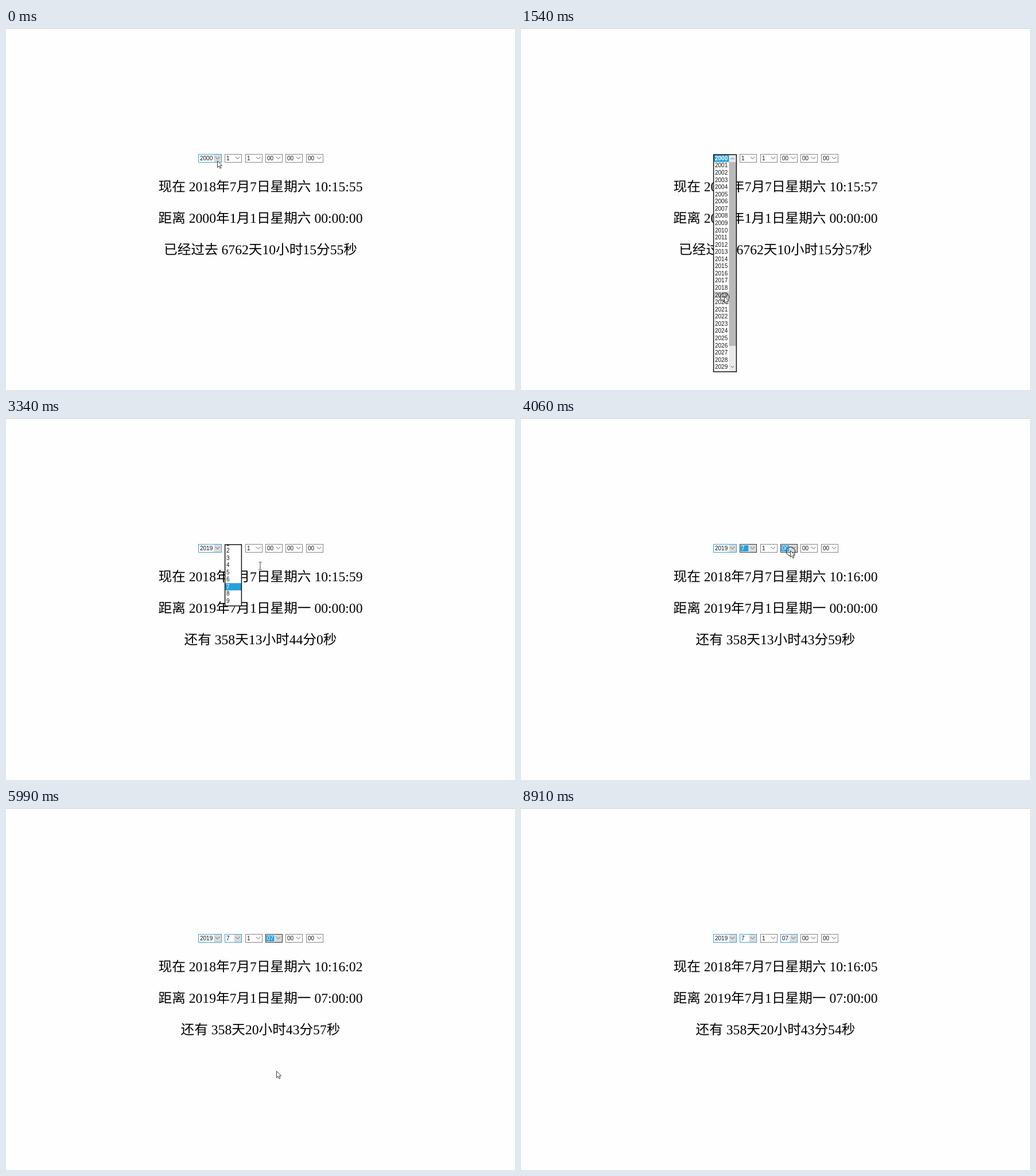
Write an HTML page that moves like this. It is 887x632 px and loops after 9.07 s.

```html
<!DOCTYPE html>
<html lang="zh-CN">
<head>
<meta charset="utf-8">
<title>日期倒计时</title>
<style>
html, body { margin: 0; width: 100%; height: 100%; overflow: hidden; background: #fefefe; }
svg { display: block; width: 887px; height: 632px; }
.line { font: 23.65px "Liberation Serif", "Noto Sans CJK SC", "Noto Sans CJK", serif; text-anchor: middle; text-rendering: geometricPrecision; }
.small { font: 10px "Liberation Sans", Arial, sans-serif; fill: #111; }
.white { fill: #fff; }
.bold { font-weight: bold; }
.chevron { fill: none; stroke: #555; }
</style>
</head>
<body>
<svg id="stage" viewBox="0 0 887 632"></svg>
<script>
const LOOP = 9070, STEP = 120, SECOND = 962;
const BLUE = '#26a0da';
const ROW = 12.57, TOP = 221.2;
const stage = document.getElementById('stage');
const pad = n => String(n).padStart(2, '0');

// Clicks alternate: open a select, pick a row; the last one lands on the blank page
const clicks = [460, 1540, 2140, 3100, 4060, 5140, 6100];

// Pointer moves: leave, arrive, x, y
const home = [368, 231.5];
const moves = [
  [580, 1420, 354, 468], [1660, 2020, 399, 231], [2260, 2980, 398, 301],
  [3220, 3340, 443, 258], [3340, 3940, 469, 231], [4180, 5020, 475, 320],
  [5500, 5980, 471, 459], [6220, 6460, 467, 457], [7540, 8540, 848, 632]
];
const GONE = 8660;

const selects = Array.from({ length: 6 }, (_, i) => {
  const l = i ? Math.round(345.9 + 35.36 * i) : 335;
  return { l, w: i ? 29 : 40, label: pad };
});
const [year, month, day, hour] = selects;
Object.assign(year, { rows: 30, pick: 19, label: i => 2000 + i, scroll: true });
Object.assign(month, { rows: 12, pick: 6, label: i => i + 1 });
Object.assign(hour, { rows: 24, pick: 7 });
day.label = month.label;

const active = [year, month, hour];
active.forEach((s, i) => {
  const [press, choose, leave] = clicks.slice(2 * i);
  Object.assign(s, { press, open: press + STEP, set: choose + STEP, close: choose + 2 * STEP, blur: leave + STEP });
});

const chosen = (s, t) => t >= s.set ? s.pick : 0;
const isOpen = (s, t) => t >= s.open && t <= s.close;

function pointer(t) {
  let [x, y] = home;
  for (const [leave, arrive, nx, ny] of moves) {
    const k = Math.min(1, Math.max(0, (t - leave) / (arrive - leave)));
    x += (nx - x) * k;
    y += (ny - y) * k;
  }
  return [x, y];
}

const rect = (x, y, w, h, fill, extra = '') =>
  `<rect x="${x}" y="${y}" width="${w}" height="${h}" fill="${fill}" ${extra}/>`;
const text = (x, y, str, cls) => `<text x="${x}" y="${y}" class="${cls}">${str}</text>`;
const chevron = (x, y, dir = 1, size = 3.7) =>
  `<path class="chevron" d="M${x - size} ${y - 2 * dir}l${size} ${size * dir} ${size} ${-size * dir}"/>`;

function drawSelect(s, t) {
  const { l, w } = s, r = l + w;
  const hot = t >= s.press - STEP || (s === year);
  const focus = t >= s.press && t < s.blur;
  const edge = focus ? '#333' : hot ? '#3ba3dc' : '#858585';
  return rect(l + .5, 220.5, w, 14, '#fff', `stroke="${edge}"`)
    + (hot ? rect(r - 12.5, 221, 12.5, 13, '#dadada') : '')
    + (focus ? rect(l + 1.5, 222, w - 15, 11, BLUE) : '')
    + text(l + 3, 231, s.label(chosen(s, t)), focus ? 'small white' : 'small')
    + chevron(r - 6.5, 227);
}

function drawList(s, t) {
  const { l, w } = s, r = l + w;
  const closing = t === s.close;
  const full = s.rows * ROW + 2;
  const h = full * (closing ? .7 : t === s.open ? .58 : 1);
  const top = closing ? TOP - 8.3 : TOP;
  const sel = chosen(s, t);
  const [px, py] = pointer(t - STEP); // the hover bar trails the pointer
  const over = !closing && px > l && px < r ? Math.floor((py - TOP) / ROW) : -1;

  let out = `<clipPath id="view"><rect x="${l}" y="221" width="${w + 1}" height="${h}"/></clipPath>`
    + rect(l + .5, 221, w, h, '#fff') + '<g clip-path="url(#view)">';
  for (let i = 0; i < s.rows; i++) {
    const y = top + i * ROW, on = i === sel;
    if (on || i === over) out += rect(l + 1, y, w - 1, ROW, on ? BLUE : '#d5d5d5');
    out += text(l + 3, y + 9.6, s.label(i), 'small' + (on ? ' white' : '') + (on && !i ? ' bold' : ''));
  }
  if (s.scroll) {
    const x = r - 12.5, mid = r - 6.5;
    out += rect(x, 221, 12.5, full, '#e9e9e9') + rect(x, 234, 12.5, 321, '#b9b9b9')
      + chevron(mid, 227.5, -1, 2.8) + chevron(mid, 592, 1, 2.8);
  }
  return out + '</g>' + rect(l + .6, 221.1, w - .2, h, 'none', 'stroke="#111" stroke-width="1.5"');
}

function drawPointer(t, list) {
  if (t >= GONE) return '';
  const [x, y] = pointer(t);
  const overList = list && x > list.l && x < list.l + list.w;
  const overText = y > 250 && y < 400 && !overList;
  const ring = clicks.includes(t)
    ? `<circle cx="${x + 1}" cy="${y + 2}" r="7.8" fill="none" stroke="#222"/>` : '';
  const shape = overText
    ? '<path d="M-2.5-6.5h2l.5.5.5-.5h2M0-6V6M-2.5 6.5h2l.5-.5.5.5h2" fill="none" stroke="#444"/>'
    : '<path d="M.5.5V12L3.2 9.5 5 13.7 6.9 12.9 5.1 8.8H8.6Z" fill="#fff" stroke="#222" stroke-width=".9"/>';
  return `${ring}<g transform="translate(${x} ${y})">${shape}</g>`;
}

function dateText(ms) {
  const d = new Date(ms);
  return `${d.getUTCFullYear()}年${d.getUTCMonth() + 1}月${d.getUTCDate()}日星期${'日一二三四五六'[d.getUTCDay()]} `
    + [d.getUTCHours(), d.getUTCMinutes(), d.getUTCSeconds()].map(pad).join(':');
}

function spanText(now, goal) {
  const past = now >= goal;
  const s = past ? (now - goal) / 1000 : (goal - now) / 1000 - 1;
  const part = (unit, cycle) => Math.floor(s / unit) % cycle;
  return `${past ? '已经过去' : '还有'} ${Math.floor(s / 86400)}天${part(3600, 24)}小时${part(60, 60)}分${part(1, 60)}秒`;
}

function draw(t) {
  const now = Date.UTC(2018, 6, 7, 10, 15, 56 + Math.floor((t - 190) / SECOND));
  const goal = Date.UTC(2000 + chosen(year, t), chosen(month, t), 1, chosen(hour, t));
  const list = active.find(s => isOpen(s, t));
  const lines = ['现在 ' + dateText(now), '距离 ' + dateText(goal), spanText(now, goal)];

  stage.innerHTML = rect(0, 0, 887, 1, '#c9c9c9')
    + lines.map((str, i) => text(443.5, 285 + 55 * i, str, 'line')).join('')
    + selects.filter(s => s !== list).map(s => drawSelect(s, t)).join('')
    + (list ? drawList(list, t) : '')
    + drawPointer(t, list);
}

// The screen refreshes in even steps
let shown;
function tick() {
  const t = performance.now() % LOOP;
  const step = Math.max(0, Math.floor((t - 100) / STEP) * STEP + 100);
  if (step !== shown) draw(shown = step);
  requestAnimationFrame(tick);
}
tick();
</script>
</body>
</html>
```
